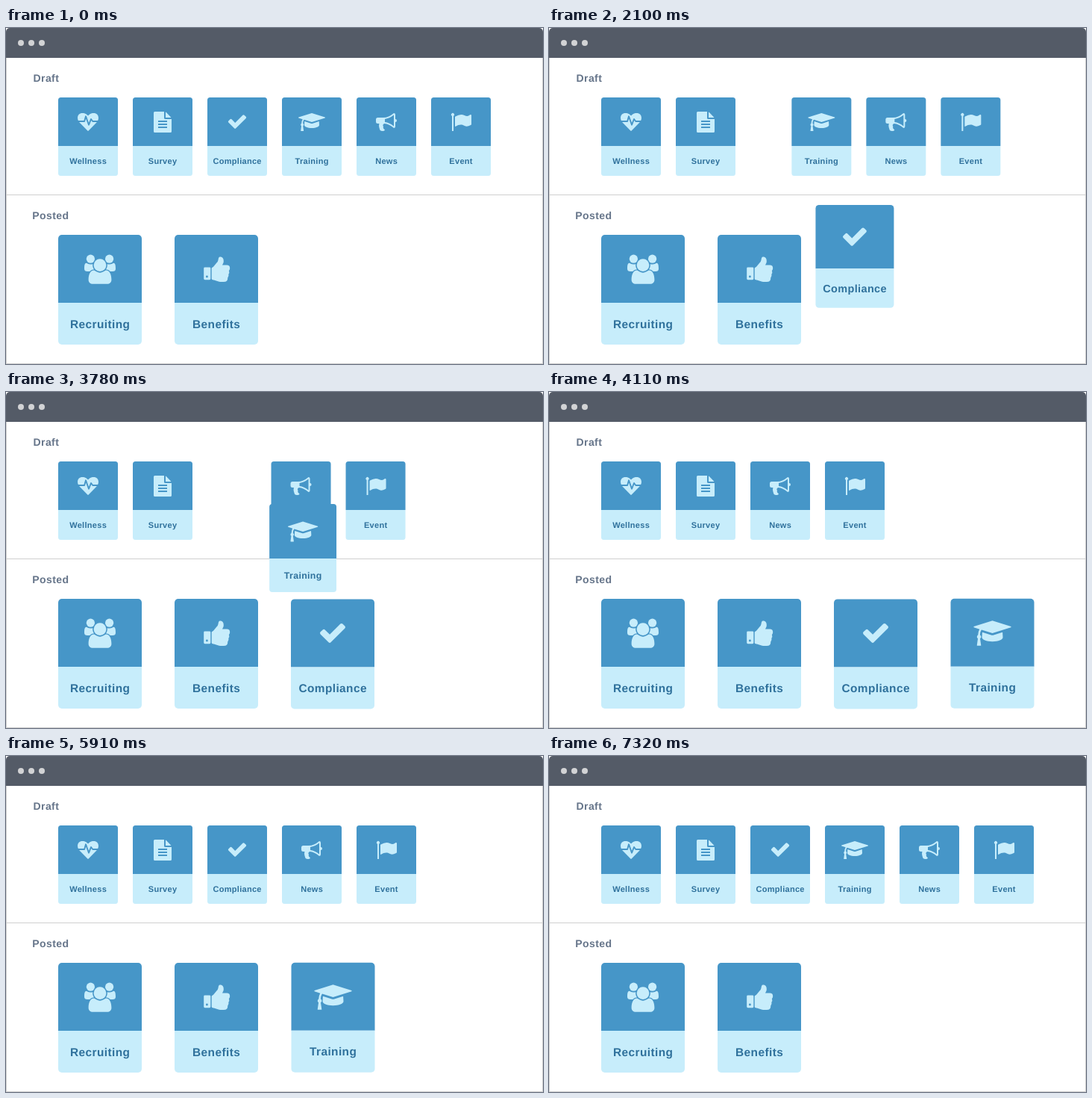
Write an HTML page with a canvas that moves like this. It is 720 px wide and 450 px high and loops after 7.35 s.

```html
<!DOCTYPE html>
<html lang="en">
<head>
<meta charset="utf-8">
<title>Draft and posted cards</title>
<style>
html, body { margin: 0; width: 100%; height: 100%; overflow: hidden; background: #fff; }
canvas { display: block; }
</style>
</head>
<body>
<canvas id="stage" width="720" height="450"></canvas>
<script>
const ctx = document.getElementById('stage').getContext('2d');
const LOOP = 7350;
const BLUE = '#4696c8', PALE = '#c7edfb', LABEL = '#2f719c', HEADING = '#66758a';

const fillPath = d => {
  const path = new Path2D(d);
  return () => ctx.fill(path, 'evenodd');
};

const linePath = (d, width) => {
  const path = new Path2D(d);
  return () => {
    ctx.strokeStyle = BLUE;
    ctx.lineWidth = width;
    ctx.lineJoin = 'round';
    ctx.stroke(path);
  };
};

const dot = (x, y, r) => {
  ctx.beginPath();
  ctx.arc(x, y, r, 0, 7);
  ctx.fill();
};

// Icons are drawn in the units of an 80 by 105 card.
const heart = fillPath('M40 24.4C43 21.4 45.7 21 47.5 21C51.5 21 54 23.3 54 27.8C54 31 51.5 33.5 50 35L40.7 44.6Q40 45.2 39.3 44.6L30 35C28.5 33.5 26 31 26 27.8C26 23.3 28.5 21 32.5 21C34.3 21 37 21.4 40 24.4Z');
const pulse = linePath('M25 32H35.1L37 25.3L41 36.7L44 29L46.3 32H55', 1.9);
const page = fillPath('M29.5 19H42V27.5Q42 29 43.5 29H52V45.5Q52 47 50.5 47H29.5Q28 47 28 45.5V20.5Q28 19 29.5 19ZM44 19.6V27H51.4Q51 26.3 50.6 25.9L45.1 20.2Z');
const rows = linePath('M34 32H46M34 36H46M34 40H46', 2);
const shoulder = fillPath('M34.3 33Q31.8 33.1 30.1 35H28Q25 35 25 32.5C25 29 25.5 27 26.9 27C27.5 27 28.8 28.3 31 28.3Q32 28.3 33.1 28C32.8 30 33.2 31.5 34.3 33Z');
const torso = fillPath('M34.4 34C35.2 34 36.8 36.2 40 36.2S44.8 34 45.6 34C49.5 34 51 38.4 51 43C51 45.5 49.3 47 46.8 47H33.2C30.7 47 29 45.5 29 43C29 38.4 30.5 34 34.4 34Z');

const icons = {
  Wellness() { heart(); pulse(); },
  Survey() { page(); rows(); },
  Compliance: fillPath('M51.7 27.9L38.2 41.3Q37.2 42.3 36.1 41.3L28.3 33.6Q27.3 32.5 28.3 31.4L30.5 29.3Q31.5 28.4 32.6 29.3L37.2 33.9L47.4 23.7Q48.5 22.7 49.5 23.7L51.7 25.8Q52.7 26.8 51.7 27.9Z'),
  Training: fillPath('M40 21L57.7 26.5Q58.3 27 57.7 27.5L40 33L29.7 29.8C28.8 30.6 28.2 32.4 28.2 34.7Q29.2 35.3 29.2 36.5Q29.2 37.5 28.2 38.2L29.1 44.4Q29.2 45 28.7 45H25.7Q25.1 45 25.2 44.4L26.1 38.2Q25.2 37.5 25.2 36.5Q25.2 35.3 26.2 34.7Q26.4 31.2 27.7 29.2L22.3 27.5Q21.7 27 22.3 26.5ZM49.7 32.1L50 37C50 39.2 45.8 41 40 41S30 39.2 30 37L30.3 32.1L39.3 34.9Q40 35.1 40.7 34.9Z'),
  News: fillPath('M52 29A2 2 0 0 1 52 33V39Q52 41 50 41Q43.5 35.6 37.3 35.1C35.4 35.7 34.8 37.6 36 39.1C35.2 40.8 36 42 38 43.5C37.2 45.2 33.5 45.6 31.6 44.1C30.5 40.8 29.4 38.5 30.4 35H28.5Q26 35 26 32.5V29.5Q26 27 28.5 27H36Q43 27 50 21Q52 21 52 23ZM50 38.4V23.5Q43.8 28.3 38 28.9V33.1Q43.9 33.8 50 38.4Z'),
  Event: fillPath('M30 24.7V44.5Q30 45 29.5 45H28.5Q28 45 28 44.5V24.7A2 2 0 1 1 30 24.7ZM54 24V36Q54 36.7 53.2 37.1Q49.5 39 47.4 38.8C44.7 38.8 43.5 36.6 39.8 36.6Q36.5 36.6 32.5 38.9Q32 39 32 38V26.3Q32 25.7 32.5 25.4Q36.8 22.9 40.3 22.9C43.5 22.9 46 25 48.2 25S52 23 53 23Q54 23 54 24Z'),
  Recruiting() {
    for (const side of [1, -1]) {
      ctx.save();
      ctx.translate(40, 0);
      ctx.scale(side, 1);
      ctx.translate(-40, 0);
      shoulder();
      dot(31, 23, 4);
      ctx.restore();
    }
    ctx.fillStyle = BLUE;
    dot(40, 29, 6.7);
    ctx.fillStyle = PALE;
    dot(40, 29, 6);
    torso();
  },
  Benefits: fillPath('M29 31H33.5Q34.5 31 34.5 32V42Q34.5 43 33.5 43H29Q28 43 28 42V32Q28 31 29 31ZM32 40A1 1 0 1 0 30 40A1 1 0 1 0 32 40ZM53 32Q53 33.3 52.1 34.3Q52.8 36.2 51.7 37.7Q52.2 39.7 50.9 41Q51.1 45 47 45H45C42 45 38.5 43.1 36.5 43Q35.5 42.9 35.5 42V32Q35.5 31.1 36.5 31C37.5 30.8 39.5 27.6 40.8 26.3C42.3 24.8 41.5 22.6 42.8 21.3Q43.1 21 43.5 21C46.2 21 47 22.7 47 25.3C47 27.2 45.9 28 45.7 29H50Q53 29 53 32Z')
};

const draft = i => ({ x: 70 + 100 * i, y: 93, s: 1 });
const posted = (i, dx = 0, dy = 0) => ({ x: 70 + 156 * i + dx, y: 277 + dy, s: 1.4 });
const move = (start, end, to) => ({ start, end, to });

// Cards left in a row close or open the gap just after the lifted card leaves.
const shifts = (...slots) => [
  move(1860, 2370, draft(slots[0])),
  move(3660, 4110, draft(slots[1])),
  move(5460, 5910, draft(slots[2])),
  move(6960, 7320, draft(slots[3]))
];

const cards = [
  { name: 'Wellness', home: draft(0), moves: [] },
  { name: 'Survey', home: draft(1), moves: [] },
  { name: 'Recruiting', home: posted(0), moves: [] },
  { name: 'Benefits', home: posted(1), moves: [] },
  { name: 'News', home: draft(4), moves: shifts(3, 2, 3, 4) },
  { name: 'Event', home: draft(5), moves: shifts(4, 3, 4, 5) }
];
const training = {
  name: 'Training', home: draft(3), moves: [
    move(1860, 2370, draft(2)),
    move(3600, 4060, posted(3, 0.5, -0.2)),
    move(5460, 5910, posted(2, 0.5, -0.2)),
    move(6900, 7320, draft(3))
  ]
};
const compliance = {
  name: 'Compliance', home: draft(2), moves: [
    move(1800, 2250, posted(2, 0, 0.4)),
    move(5400, 5850, draft(2))
  ]
};

const ease = p => p < 0.5 ? 2 * p * p : 1 - 2 * (1 - p) * (1 - p);
const mix = (a, b, p) => a + (b - a) * p;

function place(card, t) {
  let at = card.home;
  for (const { start, end, to } of card.moves) {
    if (t <= start) break;
    const p = ease(Math.min(1, (t - start) / (end - start)));
    at = { x: mix(at.x, to.x, p), y: mix(at.y, to.y, p), s: mix(at.s, to.s, p) };
  }
  return at;
}

function box(x, y, w, h, radii, color) {
  ctx.fillStyle = color;
  ctx.beginPath();
  ctx.roundRect(x, y, w, h, radii);
  ctx.fill();
}

function text(str, x, y, size, spacing, color, align) {
  ctx.font = `bold ${size}px "Liberation Sans", Arial, sans-serif`;
  ctx.letterSpacing = spacing + 'px';
  ctx.textAlign = align;
  ctx.fillStyle = color;
  ctx.fillText(str, x, y);
}

function drawCard(card, t) {
  const { x, y, s } = place(card, t);
  ctx.save();
  ctx.translate(x, y);
  ctx.scale(s, s);
  box(0, 0, 80, 65, [3.5, 3.5, 0, 0], BLUE);
  box(0, 65, 80, 40, [0, 0, 3.5, 3.5], PALE);
  ctx.fillStyle = PALE;
  icons[card.name]();
  text(card.name, 40.1, 89, 11, 0.3, LABEL, 'center');
  ctx.restore();
}

function drawWindow() {
  ctx.fillStyle = '#fff';
  ctx.fillRect(0, 0, 720, 450);
  ctx.fillStyle = '#d0d0d0';
  ctx.fillRect(0, 40, 1, 410);
  ctx.fillRect(719, 40, 1, 410);
  ctx.fillRect(0, 449, 720, 1);
  ctx.fillRect(0, 223, 720, 1);
  box(0, 0, 720, 40, [5, 5, 0, 0], '#545b67');
  ctx.fillStyle = '#d2d3d5';
  for (const x of [20, 34, 48]) dot(x, 20, 4);
  text('Draft', 36.5, 71.5, 14, 0.42, HEADING, 'left');
  text('Posted', 35.2, 255.5, 14, 0.42, HEADING, 'left');
}

function frame() {
  const t = performance.now() % LOOP;
  const complianceOnTop = t < 3000 || (t > 4800 && t < 6500);
  const top = complianceOnTop ? [training, compliance] : [compliance, training];
  drawWindow();
  for (const card of [...cards, ...top]) drawCard(card, t);
  requestAnimationFrame(frame);
}

ctx.textRendering = 'geometricPrecision';
frame();
</script>
</body>
</html>
```
